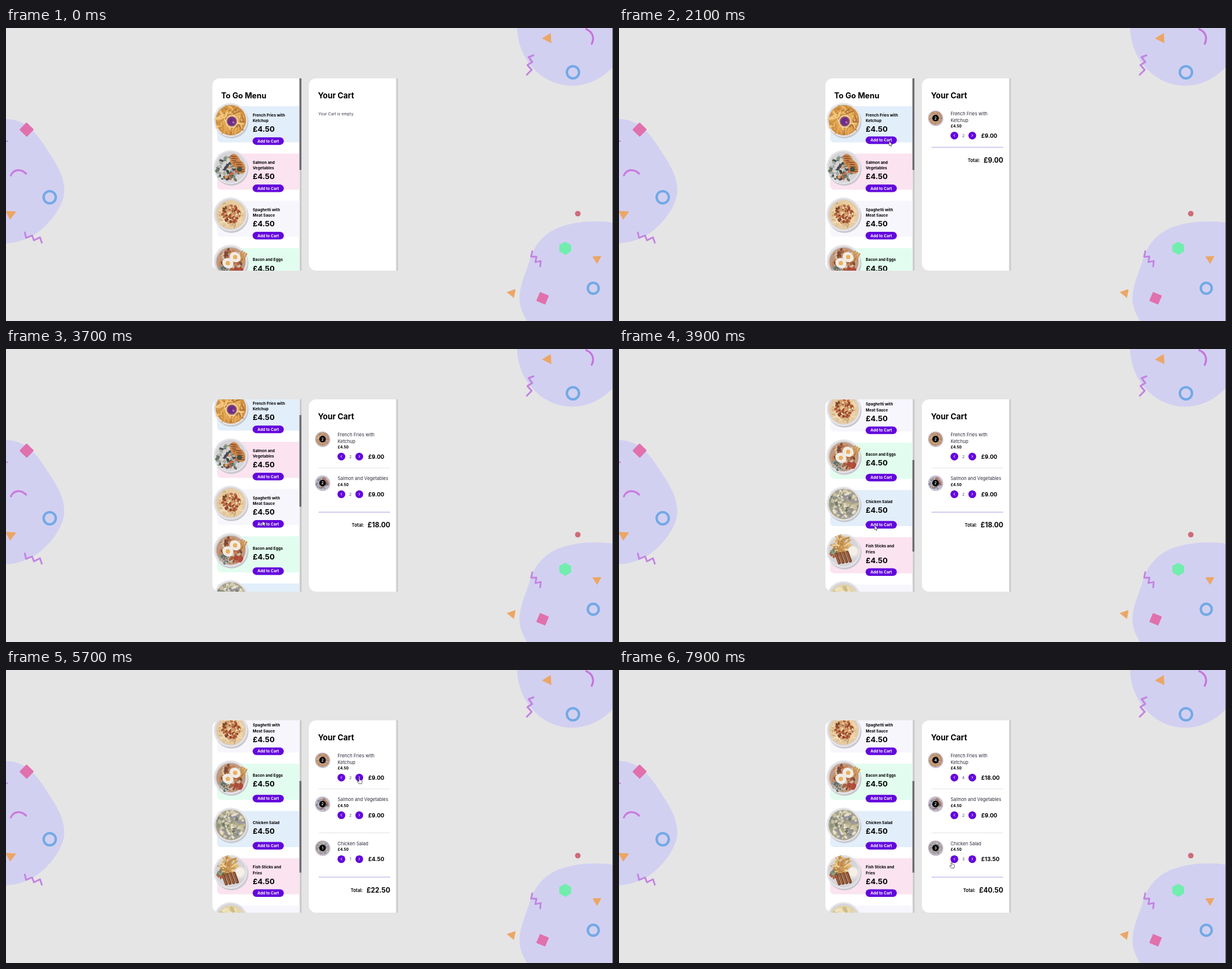
Animation, 1000 px wide and 483 px high, one loop 8 s. Source, as an HTML page with a canvas:

```html
<!DOCTYPE html>
<html lang="en">
<head>
<meta charset="utf-8">
<title>To Go Menu</title>
<style>
  html, body { margin: 0; width: 100%; height: 100%; overflow: hidden; background: #e5e5e5; }
  canvas { display: block; width: 100vw; height: 100vh; }
</style>
</head>
<body>
<canvas width="1000" height="483"></canvas>
<script>
const ctx = document.querySelector('canvas').getContext('2d');
const LOOP = 8000, STEP = 100, PRICE = 4.5, PITCH = 77.9, SCROLL = 208.2;
const PURPLE = '#6305dc', ORANGE = '#eca664', PINK = '#e071ad', BLUE = '#73a9e6', VIOLET = '#c384e2';
const CARD_COLORS = ['#e2eefa', '#fbe3f0', '#f7f6fd', '#e2fdf0'];

const menu = [
  { lines: ['French Fries with', 'Ketchup'], food: fries },
  { lines: ['Salmon and', 'Vegetables'], food: salmon },
  { lines: ['Spaghetti with', 'Meat Sauce'], food: spaghetti },
  { lines: ['Bacon and Eggs'], food: baconAndEggs },
  { lines: ['Chicken Salad'], food: salad },
  { lines: ['Fish Sticks and', 'Fries'], food: fishSticks },
  { lines: ['Mashed Potatoes'], food: potatoes }
];

// [time, change in quantity]
const cart = [
  { lines: ['French Fries with', 'Ketchup'], food: fries, clicks: [[1700, 1], [2000, 1], [5800, 1], [5900, 1]] },
  { lines: ['Salmon and Vegetables'], food: salmon, clicks: [[2900, 1], [3400, 1]] },
  { lines: ['Chicken Salad'], food: salad, clicks: [[4700, 1], [6800, 1], [7000, 1], [7200, 1], [7700, -1]] }
];

// [time, x, y]
const pointerPath = [
  [200, 610, 138], [400, 551, 148], [700, 547, 152], [1300, 437, 193], [1500, 445, 187],
  [2500, 445, 187], [2800, 427, 264], [3500, 427, 264], [3800, 421, 291], [4800, 421, 291],
  [5500, 582, 177], [6200, 582, 177], [6700, 582, 308], [7200, 582, 308], [7600, 550, 309], [7900, 548, 316]
];

const smooth = p => p * p * (3 - 2 * p);
const ramp = (t, a, b) => smooth(Math.min(1, Math.max(0, (t - a) / (b - a))));
const pounds = n => '£' + n.toFixed(2);

function randomizer(seed) {
  return () => (seed = (seed * 16807) % 2147483647) / 2147483647;
}

function at(x, y, draw, angle = 0, scale = 1) {
  ctx.save();
  ctx.translate(x, y);
  ctx.rotate(angle);
  ctx.scale(scale, scale);
  draw();
  ctx.restore();
}

function shape(path, fill, stroke, width) {
  const p = new Path2D(path);
  if (fill) { ctx.fillStyle = fill; ctx.fill(p); }
  if (stroke) {
    ctx.strokeStyle = stroke;
    ctx.lineWidth = width;
    ctx.lineCap = ctx.lineJoin = 'round';
    ctx.stroke(p);
  }
}

function ellipse(x, y, rx, ry, color, angle = 0) {
  ctx.fillStyle = color;
  ctx.beginPath();
  ctx.ellipse(x, y, rx, ry, angle, 0, 7);
  ctx.fill();
}

const disc = (x, y, r, color) => ellipse(x, y, r, r, color);

function ring(x, y, r, color, width) {
  ctx.strokeStyle = color;
  ctx.lineWidth = width;
  ctx.beginPath();
  ctx.arc(x, y, r, 0, 7);
  ctx.stroke();
}

function box(x, y, w, h, color, radii = 0) {
  ctx.fillStyle = color;
  ctx.beginPath();
  ctx.roundRect(x, y, w, h, radii);
  ctx.fill();
}

// y is the middle of the capitals
function text(str, x, y, size, weight = 700, color = '#000', align = 'left') {
  ctx.font = `${weight} ${size}px Inter, sans-serif`;
  ctx.fillStyle = color;
  ctx.textAlign = align;
  ctx.fillText(str, x, y + size * 0.36);
  return ctx.measureText(str).width;
}

// ---- Food, drawn around the plate centre ----

function scatter(seed, count, spread, colors, rx, ry, cx = 0, cy = 0) {
  const rnd = randomizer(seed);
  for (let i = 0; i < count; i++) {
    const a = rnd() * 6.283, d = spread * Math.sqrt(rnd());
    const size = 0.6 + rnd() * 0.6;
    ellipse(cx + d * Math.cos(a), cy + d * Math.sin(a), rx * size, ry * size,
      colors[Math.floor(rnd() * colors.length)], rnd() * 3.14);
  }
}

function fries() {
  disc(0, 0, 25, '#cf8f42');
  scatter(11, 130, 20, ['#e9b05a', '#d3933f', '#f2c981', '#b0743a', '#e0a453'], 8, 1.5);
  disc(1.5, 2, 9.5, '#a76a45');
  ring(1.5, 2, 9.5, '#f1dfc6', 1.6);
  disc(1.5, 2, 7, '#6d2d91');
  scatter(5, 8, 5, ['#8c3657', '#b27a9a', '#5420b4'], 2, 1, 1.5, 2);
}

function salmon() {
  scatter(23, 85, 20, ['#414d43', '#84917f', '#d4d2cd', '#4b4757', '#a4a9a4', '#687662'], 3.6, 2.3, -3, 3);
  for (const [x, y] of [[7, -11], [15, -1]]) {
    at(x, y, () => {
      ellipse(0, 0, 8, 12, '#cf8a4c');
      for (let i = -8; i <= 8; i += 4) ellipse(0, i, 6, 0.9, '#8a4c2c', 0.5);
    }, -0.4);
  }
  scatter(8, 9, 13, ['#cd6542', '#e09a5c', '#37463a'], 2.6, 2.6, -3, 8);
  disc(14, 3, 4, '#3c5144');
}

function spaghetti() {
  disc(0, 0, 24, '#e6cba2');
  scatter(31, 90, 20, ['#f2e0bf', '#d8b688', '#ead0a2', '#c9a677'], 6, 1);
  scatter(37, 85, 15, ['#a04a2a', '#bd6a40', '#7c3a2a', '#d39a68'], 2.6, 1.8, 0, -1);
  scatter(41, 9, 15, ['#5b713c', '#f4e6c8'], 1.6, 1.1);
}

function baconAndEggs() {
  disc(0, 0, 24, '#bf9a80');
  scatter(43, 75, 20, ['#a4603f', '#c4855a', '#7e4a38', '#d9bfa0'], 4.5, 2);
  scatter(47, 40, 9, ['#8f9a94', '#63706a', '#b8bfba'], 2, 2, -10, 13);
  at(18, -9, () => {
    for (const x of [-5, -1, 3]) box(x, -9, 3.2, 18, '#d09a58', 1.5);
  }, 0.5);
  for (const [x, y] of [[7, -8], [-5, 2]]) {
    ellipse(x, y, 9.5, 8, '#f2ebe4', 0.5);
    disc(x, y, 3.6, '#e8b260');
  }
  scatter(53, 6, 6, ['#b0493a', '#c9644c'], 3.6, 3, 12, 15);
}

function salad() {
  disc(0, 0, 25, '#a5a28c');
  scatter(59, 170, 22, ['#c8c1a0', '#8e9380', '#e6e0ca', '#717768', '#b4ab88', '#d4ccb0', '#9a95a0'], 3.6, 2.2);
}

function fishSticks() {
  scatter(61, 60, 13, ['#e6bd76', '#d0a05c', '#efd29a', '#bd8a4c'], 8, 1.5, -3, -11);
  scatter(67, 24, 7, ['#7a8466', '#929b7c', '#b85a44'], 2.6, 2.2, -15, 4);
  disc(15, 1, 10, '#e4e1e2');
  disc(15, 0, 7.5, '#f5efe6');
  for (let i = 0; i < 4; i++) {
    at(-10 + i * 6, 12 - i, () => {
      box(-2.6, -10, 5.2, 20, '#7d482c', 2);
      box(-1.5, -9, 1.8, 17, '#a8693c', 1);
    }, -0.35);
  }
}

function potatoes() {
  disc(0, 0, 23, '#e4d4a6');
  scatter(71, 60, 18, ['#efe3bd', '#d9c792', '#e8dab1', '#cdbb87'], 6, 3);
}

function plate(x, y, food, scale = 1) {
  at(x, y, () => {
    disc(1, 2, 28, '#c7c7cc');
    disc(-0.5, -0.5, 28, '#e5e4e8');
    disc(-0.5, -0.5, 25.5, '#d6d4d8');
    food();
  }, 0, scale);
}

// ---- Stage ----

function background() {
  box(0, 0, 1000, 483, '#e5e5e5');
  const blob = '#d2d0f1';
  shape('M0 150C38 151 54 179 72 207C90 234 96 250 96 269C96 291 74 322 51 338C35 349 17 354 0 355Z', blob);
  shape('M842 0C843 34 858 59 880 77C900 92 920 96 938 95C965 93 985 80 1000 64V0Z', blob);
  shape('M858 483C850 468 845 457 846 443C847 422 856 405 862 385C870 357 886 339 910 329C940 318 975 317 1000 321V483Z', blob);

  shape('M884 17L897 9L898 24Z', ORANGE, ORANGE, 1);
  shape('M956 2C966 6 970 16 965 26', null, '#c673dc', 3.2);
  shape('M869 45L861 48L867 56L859 61L866 69L858 77', null, VIOLET, 3);
  ring(934, 73, 10, BLUE, 4);

  at(34, 167.5, () => box(-8.5, -8.5, 17, 17, PINK, 1.5), 0.77);
  shape('M8 243C13 232 25 232 33 240', null, '#c97bdd', 3.2);
  shape('M0 186L2 187', null, VIOLET, 2);
  ring(72, 279, 10, BLUE, 4);
  shape('M0 302L16 303L7 315Z', ORANGE, ORANGE, 1);
  shape('M31 337L33 346L43 342L46 350L56 345L59 354', null, VIOLET, 2.8);

  disc(942, 306, 4.6, '#cf6a78');
  shape('M921.5 353L930.5 358V368L921.5 373.5L912 368V358Z', '#71edae', '#71edae', 1);
  shape('M967 377L980 376.5L974 388Z', ORANGE, ORANGE, 1);
  shape('M867 368L865 377L874 377L872 386L881 384L880 393', null, VIOLET, 2.8);
  ring(967.5, 429, 9, BLUE, 4);
  shape('M826 435.5L839 431L836.5 444Z', ORANGE, ORANGE, 1);
  at(884, 445.5, () => box(-8, -8, 16, 16, PINK, 1), 0.4);
  box(999, 0, 1, 483, '#55555c');
}

function panel(x, track, content) {
  box(x + 143.5, 83, 3.5, 317, track);
  ctx.save();
  ctx.beginPath();
  ctx.roundRect(x, 83, 143.5, 317, [12, 0, 0, 12]);
  ctx.fillStyle = '#fff';
  ctx.fill();
  ctx.clip();
  content();
  ctx.restore();
}

function menuItem(item, index, top, lift) {
  box(348, top, 136, 59.5, CARD_COLORS[index % 4], [6, 0, 0, 6]);
  plate(370.5, top + 23, item.food);
  const double = item.lines.length > 1;
  item.lines.forEach((line, i) => text(line, 406.5, top + (double ? 14.5 : 19.5) + i * 9.5, 6.35));
  text(pounds(PRICE), 406.5, top + (double ? 38 : 33.5), 12.4);
  box(406.3, top + 51.2 - lift, 51.4, 12.5, PURPLE, 6.25);
  text('Add to Cart', 432, top + 57.4 - lift, 6.4, 700, '#fff', 'center');
}

function menuPanel(t) {
  const scroll = SCROLL * ramp(t, 3600, 3900);
  const hovered = t >= 1500 && t < 2600;
  panel(340, '#cbcbcb', () => {
    text('To Go Menu', 354.5, 111.5 - scroll, 12.8);
    menu.forEach((item, i) => menuItem(item, i, 129 + PITCH * i - scroll, i === 0 && hovered ? 1.5 : 0));
  });
  box(483.5, 83 + scroll * 0.48, 3, 151, '#66666a');
}

function stepButton(x, y, dir) {
  disc(x, y, 6.4, PURPLE);
  shape(`M${x - dir * 0.8} ${y - 1.9}L${x + dir} ${y - 0.2}L${x - dir * 0.8} ${y + 1.5}`, null, '#fff', 0.9);
}

function cartItem(item, quantity, y) {
  plate(521.5, y, item.food, 0.44);
  disc(521.5, y, 12.4, 'rgba(155,142,178,.4)');
  disc(521.5, y, 5.4, '#000');
  text(quantity, 521.5, y, 6.2, 600, '#fff', 'center');

  const extra = (item.lines.length - 1) * 10.3;
  const first = extra ? -7 : -7.5;
  item.lines.forEach((line, i) => text(line, 546.3, y + first + i * 10.3, 7.5, 400, '#2c2838'));
  text(pounds(PRICE), 546.5, y + 2.7 + extra, 6.2);
  const row = y + 18.5 + extra;
  stepButton(552.5, row, -1);
  text(quantity, 567.3, row, 6.8, 400, '#555', 'center');
  stepButton(582, row, 1);
  text(pounds(quantity * PRICE), 596.7, row + 0.2, 9.1);
}

function cartPanel(t) {
  const rows = cart
    .map(item => ({ item, quantity: item.clicks.reduce((n, [time, d]) => n + (t >= time ? d : 0), 0) }))
    .filter(row => row.quantity);
  panel(499, '#cfcfcf', () => {
    text('Your Cart', 514, 111.5, 12.9);
    if (!rows.length) return text('Your Cart is empty', 514.5, 141.2, 6.6, 400, '#3c3848');
    rows.forEach(({ item, quantity }, i) => {
      const y = 148.5 + 72.4 * i;
      cartItem(item, quantity, y);
      if (i < rows.length - 1) box(515, y + 47, 118, 1, '#e3e2e8');
      else box(515, y + 47.2, 118, 2, '#d5cdf3');
    });
    const y = 218 + 72.4 * (rows.length - 1);
    const total = rows.reduce((sum, row) => sum + row.quantity * PRICE, 0);
    const width = text(pounds(total), 633, y, 11.1, 700, '#000', 'right');
    text('Total:', 633 - width - 6, y, 7.5, 600, '#000', 'right');
  });
}

function pointer(t) {
  if (t < 200 || (t > 4800 && t < 5300)) return;
  const next = pointerPath.findIndex(key => key[0] > t);
  const b = next < 0 ? pointerPath.at(-1) : pointerPath[next];
  const a = next < 0 ? b : pointerPath[Math.max(0, next - 1)];
  const p = a === b ? 0 : ramp(t, a[0], b[0]);
  const x = a[1] + (b[1] - a[1]) * p, y = a[2] + (b[2] - a[2]) * p;
  const arrow = 'M0 0V7.2L1.7 5.7L2.8 8.2L4 7.7L2.9 5.2H5.2Z';
  const hand = 'M-.8 .8Q0 -.4 .8 .8V4L4 4.8Q5 5.3 4.7 7L4 10.5H-.8L-3.2 7Q-3 5.6 -1.8 6.3L-.8 7Z';
  at(x, y, () => shape(t >= 5300 ? hand : arrow, '#fff', '#333', 0.7));
}

function render(t) {
  background();
  menuPanel(t);
  cartPanel(t);
  pointer(t);
}

function tick(now) {
  render(Math.floor((now % LOOP) / STEP) * STEP);
  requestAnimationFrame(tick);
}
requestAnimationFrame(tick);
</script>
</body>
</html>
```
